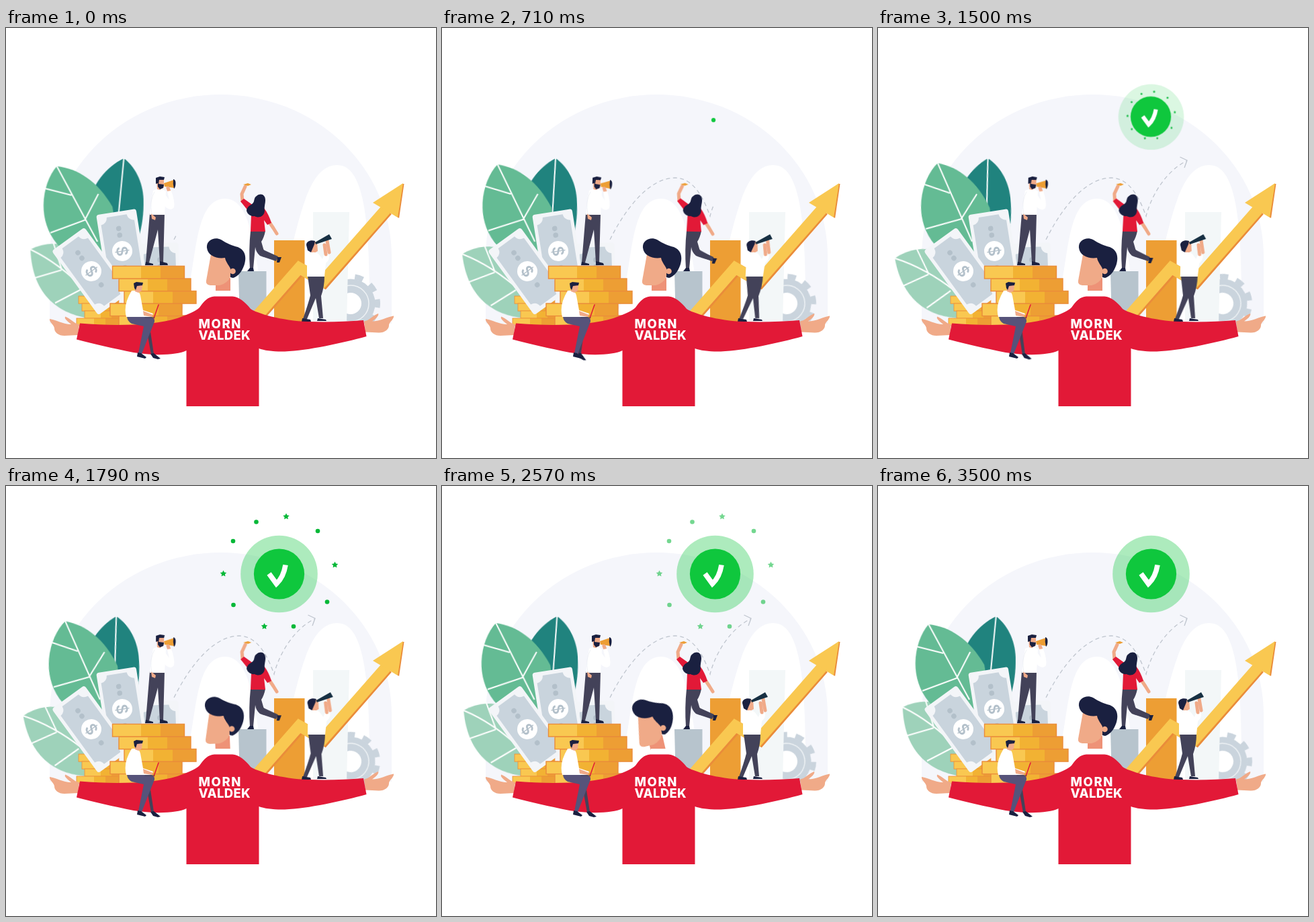
An HTML page for the animation above (3.57 s loop, 640 px wide and 640 px high).

```html
<!DOCTYPE html>
<html lang="en">
<head>
<meta charset="utf-8">
<title>Growth</title>
<style>
html, body { margin: 0; width: 100%; height: 100%; overflow: hidden; background: #fff; }
svg { display: block; width: 100%; height: 100%; }
.skin { fill: #f0aa88; }
.navy { fill: #1a2040; }
.red { fill: #e21937; }
.white { fill: #fff; }
.pants { fill: #434259; }
.gold { fill: #ed9e34; }
.line { fill: none; stroke-linecap: round; stroke-linejoin: round; }
.limb { stroke: #f0aa88; stroke-width: 5; }
.vein { fill: none; stroke: #fff; stroke-width: 2; }
.brand { font: 800 18.5px Inter, "Open Sans", sans-serif; letter-spacing: 1.6px; fill: #fff; }
.sign { font: 600 23px Inter, "Open Sans", sans-serif; text-anchor: middle; fill: #b3c0ca; }

.leaf { animation: sway 1785ms cubic-bezier(.37, 0, .63, 1) -245ms infinite alternate; }
@keyframes sway { to { transform: rotate(var(--a)); } }

.lean, .tilt, .gear, .head, .leg, .trail, .core, .halo, .tick, .burst { animation: 3570ms linear infinite; }

.lean { animation-name: lean; transform-origin: 458px 436px; }
@keyframes lean {
  0%, 60%, 100% { transform: none; animation-timing-function: ease-in-out; }
  20%, 25% { transform: skewX(-3.2deg); }
  32% { transform: skewX(-2.6deg); }
  42% { transform: skewX(-1.5deg); }
}
.tilt { animation-name: tilt; animation-timing-function: ease-in-out; }
@keyframes tilt {
  0%, 58%, 100% { transform: none; }
  20%, 30% { transform: rotate(var(--a)); }
}
.leg { animation-name: leg; animation-timing-function: ease-in-out; transform-origin: 213px 438px; }
@keyframes leg {
  0%, 47%, 100% { transform: none; }
  19% { transform: rotate(16deg); }
  32% { transform: rotate(6deg); }
}
.head { animation-name: head; animation-timing-function: ease-in-out; transform-origin: 325px 398px; }
@keyframes head {
  0%, 44%, 97%, 100% { transform: none; }
  65%, 75% { transform: rotate(-13deg); }
}
.gear { animation-name: gear; transform-origin: 513px 410px; }
@keyframes gear { to { transform: rotate(-36deg); } }

.trail { animation-name: trail; stroke-dasharray: 100 200; }
@keyframes trail { 0% { stroke-dashoffset: 97; } 28%, 100% { stroke-dashoffset: 0; } }

.core, .halo, .burst { transform-origin: 406.5px 131px; }
.core { animation-name: core; }
@keyframes core {
  0%, 18.5% { transform: translate(-2.5px, 6px) scale(0); }
  19.9% { transform: translate(-2.5px, 6px) scale(.08); }
  26% { transform: scale(1.12); }
  31.9%, 35% { transform: none; animation-timing-function: ease-in-out; }
  42% { transform: translate(-.5px, 1px) scale(.8); animation-timing-function: ease-in-out; }
  49%, 100% { transform: none; }
}
.halo { animation-name: halo; }
@keyframes halo {
  0%, 19.9% { transform: scale(0); opacity: .14; }
  28% { transform: scale(1.4); opacity: .14; }
  31.9% { transform: scale(1.13); opacity: .14; }
  42% { transform: translate(0, 1.5px) scale(.85); opacity: .15; }
  50%, 100% { transform: none; opacity: .34; }
}
.tick { animation-name: tick; stroke-dasharray: 100 200; }
@keyframes tick { 0%, 26% { stroke-dashoffset: 101; } 31.9% { stroke-dashoffset: 44; } 38%, 100% { stroke-dashoffset: 0; } }
.burst { animation-name: burst; }
@keyframes burst {
  0%, 39% { transform: scale(.2); opacity: 0; }
  40% { transform: scale(.3); opacity: 1; }
  42% { transform: scale(.42); opacity: 1; }
  48% { transform: scale(.95); opacity: 1; }
  50%, 63% { transform: none; opacity: 1; }
  72% { transform: none; opacity: .56; }
  85%, 100% { transform: none; opacity: 0; }
}
</style>
</head>
<body>
<svg viewBox="0 0 640 640">
<defs>
  <linearGradient id="coinFill">
    <stop offset=".4" stop-color="#f9c851"/><stop offset=".4" stop-color="#f2b233"/>
    <stop offset=".67" stop-color="#f2b233"/><stop offset=".67" stop-color="#ed9e34"/>
  </linearGradient>
  <rect id="coin" width="107" height="18.6" fill="url(#coinFill)" stroke="#ea8c3a" stroke-width="1.4"/>
  <g id="note">
    <rect x="-30" y="-59" width="60" height="118" rx="4" fill="#f3f5f8"/>
    <path d="M-15-53H15Q16-44 25-43V43Q16 44 15 53H-15Q-16 44-25 43V-43Q-16-44-15-53Z" fill="#c9d4dd"/>
    <circle cy="-34" r="3.8" fill="#b3c0ca"/><circle cy="-24" r="3.8" fill="#b3c0ca"/><circle cy="25" r="3.8" fill="#b3c0ca"/>
    <circle r="15" class="white"/>
    <text class="sign" y="8.300" transform="rotate(90)">$</text>
  </g>
  <g id="hand" class="skin">
    <path d="M109 441C101 440 96 432 88 429.500Q86 433 97 441C85 441 74 434 65 433 64 438 72 442 72 447 72 453 78 458 87 458L107 457Z"/>
  </g>
  <path id="star" d="M0-5 1.500-1.900 4.800-1.500 2.400.8 2.900 4 0 2.500-2.900 4-2.400.8-4.800-1.500-1.500-1.900Z"/>
  <circle id="dot" r="3.300"/>
  <mask id="reveal" maskUnits="userSpaceOnUse" x="240" y="180" width="230" height="145">
    <path class="trail" pathLength="100" fill="none" stroke="#fff" stroke-width="22"
      d="M250 315C275 265 310 223 347 223 375 223 390 255 399 280 405 255 425 215 462 196"/>
  </mask>
</defs>

<!-- backdrop -->
<path d="M65 440V340A254.500 241 0 0 1 574 340V440Z" fill="#f5f6fb"/>
<path class="white" d="M250 440C290 400 268 254 326 254 372 254 370 360 390 440Z"/>
<path class="white" d="M393 440C432 340 436 204 493 204 536 204 542 300 541 440Z"/>

<g class="gear">
  <circle cx="513" cy="410" r="36.500" fill="#cad4dd"/>
  <circle cx="513" cy="410" r="40" fill="none" stroke="#cad4dd" stroke-width="8" pathLength="10" stroke-dasharray=".5 .5" stroke-dashoffset=".25"/>
  <circle cx="513" cy="410" r="27" fill="none" stroke="#eef2f5" stroke-width="1.500"/>
  <circle cx="513" cy="410" r="16" class="white"/>
</g>
<path fill="#f3f7f8" d="M457 274H511L507 440H457Z"/>
<path fill="#b7c4cd" d="M346 362H387.500V440H348Z"/>
<path class="gold" d="M399 316H444.500V440H399Z"/>

<!-- growth arrow -->
<g stroke-width="17" fill="none">
  <path stroke="#ea8c3a" d="M375 431 439 358.500 474 378.500 567.500 271.500"/>
  <path stroke="#f9c851" d="M372.500 430 436.500 357 471.500 377 565.500 270"/>
</g>
<path fill="#ea8c3a" d="M589 232 592.500 232 585 283 579 279Z"/>
<path fill="#f9c851" d="M591 231 546 260 583 282Z"/>

<g mask="url(#reveal)" fill="none" stroke="#bfc5ce" stroke-width="1.300">
  <path stroke-dasharray="6 4.500" d="M250 315C275 265 310 223 347 223 375 223 390 255 399 280 405 255 425 215 459 198"/>
  <path d="M449.500 192 460 197 456 208"/>
</g>

<!-- foliage -->
<g class="leaf" style="--a:-8.500deg;transform-origin:124px 416px">
  <path fill="#9ed2ba" d="M37 329C60 318 85 318 100 330 125 355 130 400 124 432 82 426 39 400 37 329Z"/>
  <path class="vein" d="M37 329Q80 350 118 390M71 319 83 358M41 372 83 360M73 409 112 389"/>
</g>
<g class="leaf" style="--a:-4.300deg;transform-origin:170px 360px">
  <path fill="#20837e" d="M176 194C150 206 126 235 126 262 126 300 150 340 170 360 195 335 206 295 205 255 204 228 192 206 176 194Z"/>
  <path class="vein" d="M176 194 168 275"/>
</g>
<g class="leaf" style="--a:4.900deg;transform-origin:140px 365px">
  <path fill="#64bb94" d="M75 206C54 230 44 284 76 322 98 345 125 360 140 365 150 340 165 300 158 266 136 228 106 209 75 206Z"/>
  <path class="vein" d="M75 206 136 318M57 239 97 249M66 305 117 286 137 247"/>
</g>

<!-- money -->
<use href="#note" transform="translate(230 379)rotate(-2)scale(.95 1)"/>
<use href="#note" transform="translate(173 332)rotate(-9)"/>
<use href="#coin" transform="translate(108 399)scale(.56 .6)"/>
<use href="#coin" transform="translate(113 410)scale(.56 .6)"/>
<use href="#coin" transform="translate(117 421)scale(.56 .6)"/>
<use href="#coin" transform="translate(105 432)scale(.6)"/>
<use href="#note" transform="translate(127 362)rotate(-36)"/>
<use href="#coin" x="168" y="428"/>
<use href="#coin" x="155" y="410"/>
<use href="#coin" x="176" y="391.500"/>
<use href="#coin" x="168" y="373"/>
<use href="#coin" x="158.500" y="354.400"/>

<!-- man with megaphone -->
<path class="pants" d="M214 276H236L234 349H229L226 300 213 349H208Z"/>
<path class="navy" d="M208 348 219 351V353H207ZM229 347 240 350 241 353H229Z"/>
<path class="white" d="M219 242Q230 237 238 243L236 278H214Q217 254 219 242Z"/>
<path class="skin" d="M216 276 223 282 222 286 217 284Z"/>
<path class="line" d="M221 244Q213 258 217 277L221 276" stroke="#e6e9f0" stroke-width=".6"/>
<g class="tilt" style="--a:3deg;transform-origin:228px 246px">
  <path class="skin" d="M224 226H235V237L229 241 225 240Z"/>
  <path class="navy" d="M223 232V223L229 221 236 222 235 226 228 226 227 232 235 233 234 238 229 240 226 236 226 231Z"/>
  <path class="gold" d="M235 231 250 226V238L236 236Z"/>
  <path class="navy" d="M249 225Q253 226 252.500 232 252 238 250 239 248 232 249 225Z"/>
  <path class="line limb" d="M241 238 244 246"/>
  <path class="white" d="M234 244 243 256 240 243 246 242Q252 260 250 267 246 273 238 267L233 260Z"/>
</g>

<!-- dancer -->
<path class="pants" d="M364 302H386Q384 312 380 318L384 332 404 341 402 347 378 339Q372 334 371 326L368 358H363Q361 330 364 302Z"/>
<path class="navy" d="M363 357H368L369 362H359Z"/>
<g class="tilt" style="--a:4deg;transform-origin:382px 332px">
  <path class="pants" d="M376 334Q379 326 385 331L405 340 403 345 381 340Z"/>
  <path class="navy" d="M404 341 410 341 407 349 403 349Z"/>
</g>
<g class="tilt" style="--a:1.300deg;transform-origin:374px 303px">
  <path class="line limb" d="M352 258 351 247 356 236M392 289 398 298 403 306"/>
  <path class="gold" d="M353 233 360 231 365 233 360 235Z"/>
  <path class="red" d="M349 258 354 254 368 264 384 268Q391 277 395 290L389 293 384 286 386 303H364L365 278Z"/>
  <path class="navy" d="M373 250C379 245 386 248 386 256 386 262 384 266 385 272 384 282 375 283 370 280 364 281 358 276 358 271 360 263 367 264 369 258 370 254 370 252 373 250Z"/>
</g>

<!-- man with telescope -->
<g class="lean">
  <path class="pants" d="M449 369H474Q474 385 469 399L472 432H466L461 402 448 433H442Q450 410 453 398Z"/>
  <path class="skin" d="M454 318H463L464 332 457 336 453 332Z"/>
  <path class="navy" d="M447 323C447 317 454 315 460 317L459 322 456 329 454 334 449 331Z"/>
  <path class="white" d="M448 337Q457 331 465 336L471 344 474 336 481 338Q482 345 476 350L474 370H448Z"/>
  <path class="line limb" d="M476 337 474 323M481 334 478 317"/>
  <path fill="#173043" d="M460 319 481 307 485 314 461 322Z"/>
</g>
<path class="navy" d="M441 432 453 434 454 437H440ZM464 432 476 434 477 436H463Z"/>

<!-- giant -->
<use href="#hand"/>
<use href="#hand" transform="matrix(-1 0 0 1 642 -4.500)"/>
<g class="head">
  <path fill="#ee9277" d="M312 372H334V396H312Z"/>
  <path class="skin" d="M305 337 298 376Q297 382 304 383L318 383Q330 380 334 370L340 345Z"/>
  <path class="navy" d="M299 327C298 316 310 310 320 315 329 321 337 324 345 326 357 331 358 342 354.500 353 351 363 345 370 338 372L334 371V358C331 352 327 348 326 342 314 344 300 339 299 327Z"/>
  <circle class="skin" cx="337.500" cy="362" r="4.300"/>
</g>
<path class="white" d="M307 402 311 391H335L340 402Z"/>
<path class="red" d="M110 439.500C160 444 220 443 255 432 270 427 283 421 288 416 295 406 301 400 310 399.500H337C347 400 356 408 364 418 372 424 410 436 450 437 480 438 505 437 532 435L536.500 459C500 469 450 480 415 481.500 400 482 384 480 376.500 477V563H268.500V480C255 487 220 488 190 483 160 477 130 470 105 463.500Z"/>
<text class="brand" x="286.500" y="447">MORN</text>
<text class="brand" x="286.500" y="464" style="letter-spacing:.3px">VALDEK</text>

<!-- man with laptop -->
<g class="leg">
  <path class="pants" d="M207 436 218 436 215 452 220 485 216 486Z"/>
  <path class="navy" d="M215 485 220 484 230 492 226 493 219 491Z"/>
</g>
<path fill="#56537a" d="M180 429H212Q222 430 221 437L202 485 197 484 205 444 187 440Q180 436 180 429Z"/>
<path class="navy" d="M196 483 201 484 209 490 207 492 195 489Z"/>
<path class="white" d="M187 391Q198 389 200 398L204 420 219 425 217 430H179Q174 412 187 391Z"/>
<path class="skin" d="M191 383H203L202 391 197 394 192 392ZM204 421 219 427 217 430 205 428Z"/>
<path class="navy" d="M190 380 194 378 204 379 203 383 195 384 193 390 191 387Z"/>
<path class="line" stroke="#e21937" stroke-width="1.500" d="M227 412 220 432"/>
<path class="line" stroke="#434259" stroke-width="1.200" d="M207 431H221"/>

<!-- badge -->
<circle class="halo" cx="406.500" cy="131" r="57.300" fill="#0fc73d"/>
<g class="burst" fill="#06b838">
  <use href="#dot" x="372.500" y="53.500"/><use href="#dot" x="338" y="82"/><use href="#dot" x="464" y="67"/>
  <use href="#dot" x="478" y="172.500"/><use href="#dot" x="428" y="209"/><use href="#dot" x="338.500" y="177"/>
  <use href="#star" x="417" y="45.500"/><use href="#star" x="489.500" y="117.500"/>
  <use href="#star" x="384.500" y="209"/><use href="#star" x="323.500" y="130.500"/>
</g>
<g class="core">
  <circle cx="406.500" cy="131" r="37.600" fill="#0fc73d"/>
  <path class="tick" pathLength="100" fill="none" stroke="#fff" stroke-width="7.600" d="M391.500 130.500 402.500 145.500Q413 136 416 117.500"/>
</g>
</svg>
</body>
</html>
```
